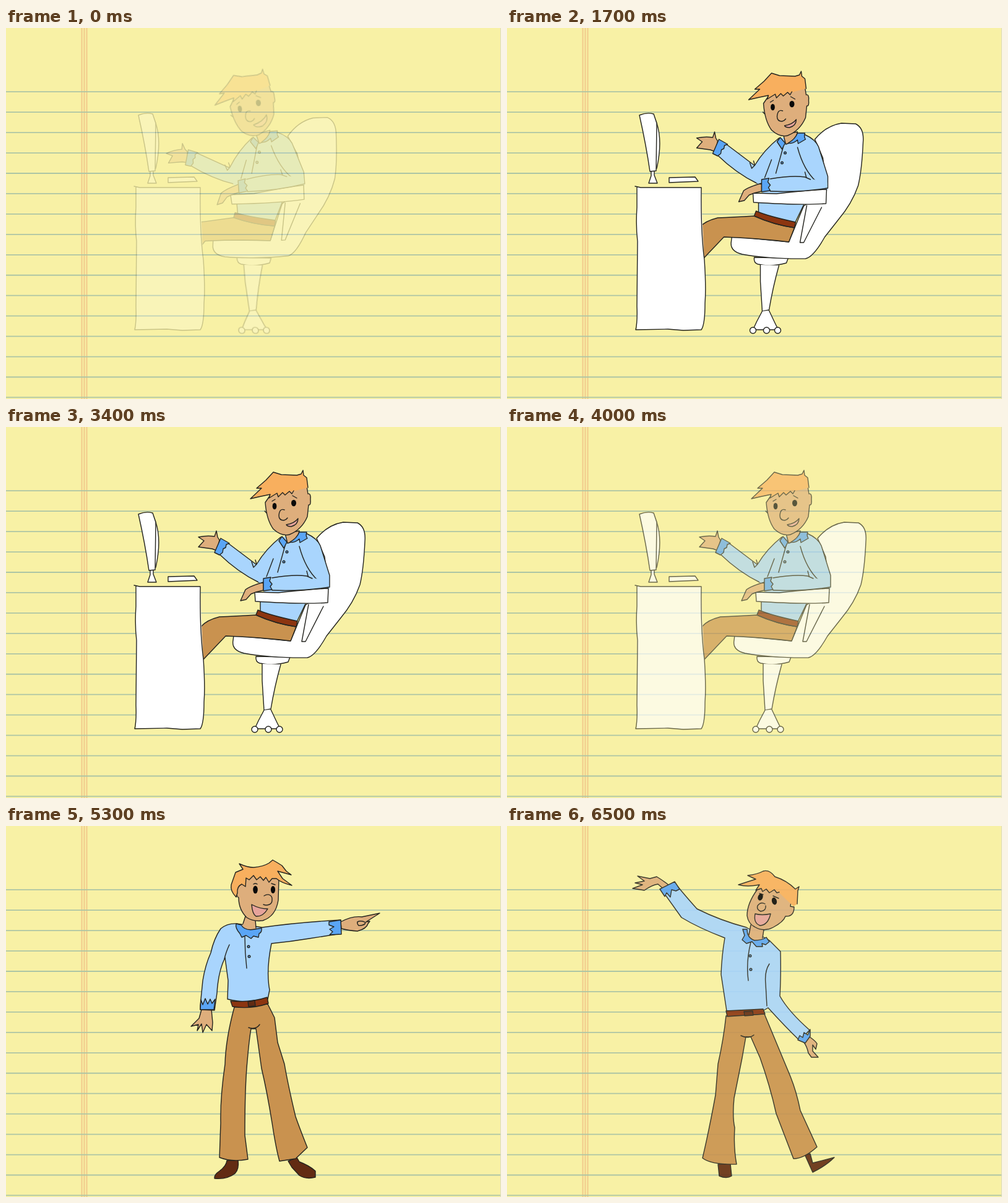
An HTML page for the animation above (6.6 s loop, 800 by 600 pixels).

```html
<!DOCTYPE html>
<html lang="en">
<head>
<meta charset="utf-8">
<title>Cartoon on notepaper</title>
<style>
html, body { margin: 0; width: 800px; height: 600px; overflow: hidden; background: #f8f1a5; }
svg { display: block; }
.pose { fill: #fff; stroke: #24241f; stroke-width: 1.4; stroke-linejoin: round; stroke-linecap: round; }
.skin { fill: #deae7c; }
.hair { fill: #f8af5e; }
.shirt { fill: #a9d5fd; }
.trim { fill: #5aa5f5; }
.pants { fill: #c9924f; }
.belt { fill: #8c3510; }
.shoe { fill: #622b13; }
.mouth { fill: #e6a39b; }
.ink { fill: #090909; stroke: none; }
.line { fill: none; }
.bare { stroke: none; }
</style>
</head>
<body>
<svg width="800" height="600" viewBox="0 0 800 600">
<g id="paper"></g>

<g class="pose" id="sit">
  <g id="base">
    <path d="M404 371Q403 380 410 382Q432 387 456 380L459 372Z"/>
    <path d="M414 383L414 410L417 458L428 456Q434 420 444 384"/>
    <path d="M417 458L408 475L402 488H443L438 478L428 457"/>
    <circle cx="402" cy="489" r="5"/><circle cx="424" cy="489" r="5"/><circle cx="442" cy="489" r="5"/>
  </g>
  <g id="body">
    <path d="M502 180Q520 158 545 154L568 155Q582 162 580 185Q578 230 572 255Q562 284 540 310L518 338Q500 370 487 373C450 374 405 370 385 366Q364 361 367 345L368 337L460 346L484 288L521 262L515 210Z"/>
    <path class="line" d="M489 287L478 347L484 347L513 290"/>
    <g id="arm">
      <path class="skin" d="M345 183L342 178L340 168L337 177Q325 175 311 178L320 184L311 194L333 197L341 200Z"/>
      <path class="shirt" d="M355 185L404 222L425 225L425 255L408 251Q375 235 344 205Z"/>
      <path class="trim" d="M347 180L361 188L356 190L355 195L351 197L350 203L345 207L337 203Z"/>
    </g>
    <path class="shirt bare" d="M444 178Q420 197 405 222L408 251L421 256L411 283L411 297Q440 312 469 315L484 286L523 261L523 240L508 192Q503 180 485 172Z"/>
    <path class="line" d="M444 178Q420 197 405 222L403 215M397 218L400 227L405 222M485 172Q503 180 508 192L523 240L523 259M432 213L421 242M451 192L439 235M474 193Q484 230 504 248M486 233L490 248M411 283V297M484 286L470 315"/>
    <path class="pants" d="M404 304Q370 306 345 307Q325 312 316 322L300 340V396L355 338Q410 340 460 346L469 323Q435 318 404 304Z"/>
    <path class="belt" d="M407 296Q425 304 471 314L469 323Q435 318 404 304Z"/>
    <path d="M402 267L440 268Q495 262 521 261L520 284Q480 287 403 282Z"/>
    <path class="shirt bare" d="M426 245Q465 237 488 242L522 250V259Q480 266 426 264Z"/>
    <path class="line" d="M430 244Q465 238 486 241L495 245M430 264Q480 266 522 259"/>
    <path class="skin" d="M416 251Q395 257 387 263L379 281L388 279L396 270L404 267L416 264Z"/>
    <path class="trim" d="M416 245L428 243L426 249L430 254L427 258L430 263L416 265Z"/>
    <path class="skin" d="M451 172L455 188L470 183L474 168Z"/>
    <path class="trim" d="M446 177L441 184L449 196L454 186Z"/>
    <path class="trim" d="M459 186Q470 180 474 170L486 170Q484 176 487 180L475 187L474 181Q466 188 459 186Z"/>
    <circle class="trim" cx="454" cy="202" r="1.8"/><circle class="trim" cx="449" cy="218" r="1.8"/>
    <g id="head">
      <path class="skin" d="M419 122Q421 150 432 165Q445 177 458 174Q478 166 487 145L489 126Q493 127 492 117Q493 107 488 108L486 96L430 106Z"/>
      <path class="hair bare" d="M395 116L413 100L405 99L420 86L432 73L445 77L470 78L477 76L480 70L481 78L486 82L488 98L465 104L458 104L451 110L447 106L440 113L438 107L425 115L427 109Z"/>
      <path class="line" d="M488 98L486 82L481 78L480 70L477 76L470 78L445 77L432 73L420 86L405 99L413 99L395 116Q412 112 427 109L425 115L438 107L440 113L447 106L451 110L458 104L462 108L465 103M418 136L421 139M430 120L435 117M463 111L470 115"/>
      <ellipse class="ink" cx="434" cy="128" rx="3.4" ry="5.2"/>
      <ellipse class="ink" cx="465" cy="123" rx="4" ry="5.2"/>
      <path class="line" d="M450 134Q442 131 441 143Q441 151 449 151Q453 150 455 147"/>
      <path class="mouth" id="mouth"/>
    </g>
  </g>
  <path d="M233 231V239L229 251H243L238 238V231Z"/>
  <path d="M237 141L242 154C249 175 248 200 242 227L236 231Z"/>
  <path d="M214 141Q226 136 237 139L242 154L241 231L231 232Q225 190 214 141Z"/>
  <path d="M262 242L304 241L309 248L262 250Z"/>
  <path class="bare" d="M210 258H314Q316 330 319 375Q322 420 320 445Q320 480 314 488L210 488Z"/>
  <path class="line" d="M207 256L216 258L314 258Q313 330 319 375Q322 420 320 445Q320 480 314 488L285 489L260 487L208 488Q211 475 210 450L211 345Q208 320 210 290V257"/>
</g>

<g class="pose" id="point">
  <path class="shoe" d="M357 541L375 540Q377 555 370 562Q357 572 337 570Q336 564 345 558Q356 550 357 541Z"/>
  <path class="shoe" d="M456 542L470 536L474 543Q490 549 500 558V568Q485 572 474 565L462 552Z"/>
  <path class="pants" d="M369 293Q355 345 354 385Q346 440 347 480L345 536Q365 544 391 539L386 500Q386 420 390 380Q393 345 396 328L404 328Q407 350 413 392Q422 430 430 480Q436 520 442 542L468 538L487 520Q475 490 468 470Q456 420 450 385L439 350L434 310L423 288Z"/>
  <path class="line" d="M392 326Q404 330 410 321"/>
  <path class="skin" d="M316 297L312 311L299 324L311 321L309 331L316 320L318 334L324 321L333 331L334 318L332 297Z"/>
  <path class="skin" d="M541 155Q560 145 575 147L604 141L582 155L588 154L585 158Q583 166 568 170Q553 169 542 166Z"/>
  <path class="skin" d="M568 155Q574 152 581 156Q580 161 570 161Q567 158 568 155Z"/>
  <path class="shirt" d="M373 158Q358 157 347 166Q336 182 331 205Q322 225 318 250L314 290V297L337 298L341 270Q343 235 354 213L359 250L358 280Q390 288 423 280L426 265Q420 235 429 190Q460 187 490 182L541 174V152Q470 156 414 164Z"/>
  <path class="line" d="M361 192Q355 205 353 215M386 179Q386 205 389 230"/>
  <path class="belt" d="M363 283Q395 286 422 277L424 287Q395 297 366 292Z"/>
  <path class="shoe" d="M391 284L402 282L403 291L392 292Z"/>
  <path class="skin bare" d="M387 145L382 162L392 170L404 166L403 150Z"/>
  <path class="line" d="M387 146L383 158M403 152L404 165"/>
  <path class="trim" d="M372 158L380 160Q386 170 402 167L413 165Q414 172 409 174L408 180L400 178L396 182L388 177L381 180L378 174Q370 165 372 158Z"/>
  <path class="trim" d="M522 155L541 152L542 175L523 176L528 171L523 167L530 163L522 160Z"/>
  <path class="trim" d="M314 297L315 281L318 289L322 279L326 288L330 280L333 287L338 280L336 297Z"/>
  <circle class="trim" cx="392" cy="195" r="1.8"/><circle class="trim" cx="393" cy="211" r="1.8"/>
  <path class="skin" d="M379 92Q372 97 372 106Q373 115 376 116Q376 135 389 148Q400 155 415 153Q436 146 440 120L441 85L390 78Z"/>
  <path class="hair" d="M372 115Q362 105 364 95L371 75L383 70L377 61Q390 67 400 67Q415 66 425 60L431 55L438 59L446 64L453 73L461 79L439 73L447 85L462 96Q445 92 437 85L430 85L425 91L420 83L416 88L411 82L405 87L400 80L393 87L388 84L387 98L381 94Q373 98 374 108Z"/>
  <ellipse class="ink" cx="403" cy="103" rx="3.8" ry="6.3"/>
  <ellipse class="ink" cx="431.5" cy="103" rx="3.6" ry="6"/>
  <path class="line" d="M400 94Q403 92 406 94M429 93L435 95M417 113C425 108 431 113 430 120C430 128 421 129 416 127"/>
  <path class="mouth" d="M397 127Q410 134 423 134Q415 147 404 146Q398 142 397 127Z"/>
</g>

<g class="pose" id="wave">
  <path class="shoe" d="M341 547L361 546L363 566Q355 571 343 566Z"/>
  <path class="shoe" d="M481 531L490 530L494 545L529 536Q515 550 494 560Z"/>
  <path class="pants" d="M354 307Q350 345 341 385L337 435Q327 490 316 537Q330 548 371 547Q366 520 368 488Q364 470 367 440L380 375L386 341H394L409 375Q425 420 435 465L463 538Q480 538 501 519L474 460Q468 430 458 405L416 304Z"/>
  <path class="line" d="M378 339Q390 345 399 338"/>
  <path class="skin" d="M262 96Q252 88 242 82L231 85L211 81L222 89L207 92L219 95L203 101L222 104Q235 95 244 94L252 101Z"/>
  <path class="skin" d="M489 341Q499 348 501 352L499 361L494 354L494 364L503 374L492 374L487 367Q485 357 480 350Z"/>
  <path class="shirt" d="M387 164Q345 153 307 134Q290 115 276 98L252 106L282 148Q310 165 352 181Q347 210 346 240L355 299L415 298L422 294Q450 325 473 347L489 330Q455 300 441 275Q443 240 442 203L424 185Z"/>
  <path class="line" d="M424 223Q416 235 418 255L420 291M394 188Q386 220 390 250"/>
  <path class="belt" d="M354 299L414 296L417 304L356 308Z"/>
  <path class="shoe" d="M383 300L397 299L398 306L384 307Z"/>
  <path class="trim" d="M271 90L279 102L273 105L266 103L264 115L258 108L255 114L247 102Z"/>
  <path class="trim" d="M490 329L490 340L482 351L470 346L473 339L478 342L480 334L486 338Z"/>
  <path class="skin bare" d="M394 158L389 180Q400 188 413 183L416 165Z"/>
  <path class="line" d="M394 160L391 176M415 168L413 181"/>
  <path class="trim" d="M381 167L388 167Q388 181 400 185Q412 185 419 180L424 187L418 192L412 190L413 195L403 195L396 187L387 190L380 184L384 177Z"/>
  <circle class="trim" cx="393" cy="210" r="1.8"/><circle class="trim" cx="394" cy="232" r="1.8"/>
  <path class="skin" d="M405 102Q388 125 388 145Q390 158 400 163Q415 172 430 164Q447 155 450 146Q464 147 464 131L458 130L461 110L432 95Z"/>
  <path class="hair bare" d="M374 95L402 86L389 80Q405 78 414 73Q424 70 433 82Q452 88 466 102L472 98L470 105L469 126L463 130Q450 118 440 108L432 103L424 108L419 102L413 106L411 101L402 104L408 95Q388 99 374 95Z"/>
  <path class="line" d="M469 126L470 105L472 98L466 102Q452 88 433 82Q424 70 414 73Q405 78 389 80L402 86L374 95Q388 99 408 95L402 104L411 101L413 106L419 102L424 108L432 103L436 108L440 107M408 109L414 111M430 113L439 117M417 126Q410 122 405 129Q403 135 410 138Q419 137 418 129"/>
  <ellipse class="ink" cx="409.5" cy="115" rx="4" ry="5.6" transform="rotate(20 409.5 115)"/>
  <ellipse class="ink" cx="432" cy="121.5" rx="4" ry="6" transform="rotate(-15 432 121.5)"/>
  <path class="mouth" d="M401 142Q412 145 426 142Q422 160 409 161Q398 157 401 142Z"/>
</g>
</svg>

<script>
const LOOP = 6600, STEP = 100, FADE = 450;
const SMILE = "M452 157Q468 154 475 144Q477 155 466 161Q455 163 452 157Z";
const GRIN = "M453 158Q466 156 472 148Q472 158 461 161Q455 161 453 158Z";
const el = id => document.getElementById(id);
const clamp = v => Math.max(0, Math.min(1, v));
const ease = v => v * v * (3 - 2 * v);
const place = (id, transform) => el(id).setAttribute("transform", transform);

// Ruled paper
let rules = "";
for (let i = 0; i < 16; i++) rules += `M0 ${103.2 + i * 32.95}H800`;
el("paper").innerHTML =
  `<path d="M122.5 0V600M126.5 0V600M130.5 0V600" stroke="#f1ca8c" stroke-width="2"/>
   <path d="${rules}" stroke="#adc5a5" stroke-width="1.8"/>
   <path d="M799.5 0V600" stroke="#dedcc4"/>`;

function fade(id, start, end, t) {
  el(id).style.opacity = clamp(Math.min(t - start, end - t) / FADE);
}

function rollChair(t) {
  const x = t < 1100 ? -21 + 7.5 * t / 1100 : -13.5 * (1 - clamp((t - 1100) / 900));
  const lean = 1 - ease(clamp(t / 900));
  place("base", `translate(${x} 489) skewX(${4.7 * lean}) translate(0 -489)`);
  place("body", `translate(${x} 0) rotate(${-4.7 * lean} 428 489)`);
  place("arm", `rotate(${-8 * lean} 405 235)`);
  place("head", `translate(${-2 * lean} 0) rotate(${-4 * lean} 455 180)`);
  el("mouth").setAttribute("d", t < 1600 ? SMILE : GRIN);
}

function draw(now) {
  const t = Math.floor(now % LOOP / STEP) * STEP;
  fade("sit", -100, 4300, t);
  fade("point", 4300, 6100, t);
  fade("wave", 6100, 8000, t);
  rollChair(t);
}

const begin = performance.now();
function tick() {
  draw(performance.now() - begin);
  requestAnimationFrame(tick);
}
tick();
</script>
</body>
</html>
```
